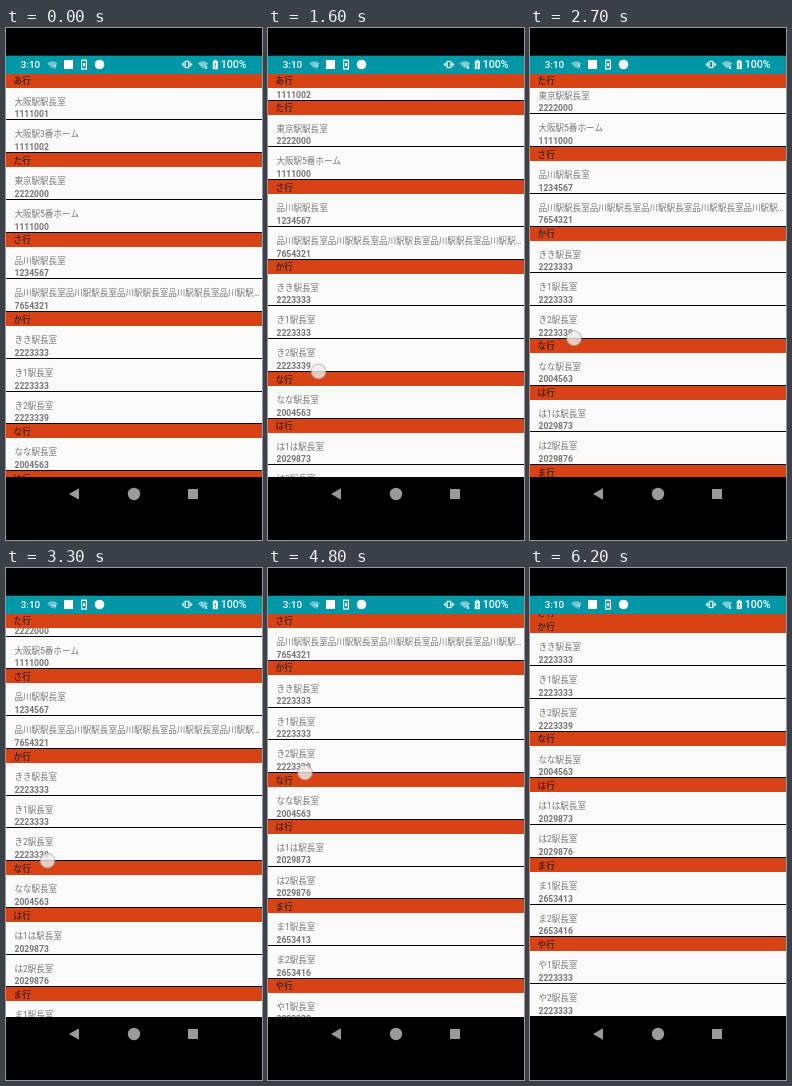
Animation of 256x512 px, one loop 6500 ms. Source, as an HTML page with a canvas:

```html
<!DOCTYPE html>
<html lang="ja">
<head>
<meta charset="utf-8">
<style>
  html, body { margin: 0; width: 100%; height: 100%; overflow: hidden; background: #000; }
  canvas { display: block; width: 256px; height: 512px; }
</style>
</head>
<body>
<canvas width="256" height="512"></canvas>
<script>
const ctx = document.querySelector('canvas').getContext('2d');
const FONT = 'Roboto, "Noto Sans CJK JP", "Noto Sans CJK", sans-serif';
const LOOP = 6500, STEP = 100;
const TOP = 46.2, BOTTOM = 449, HEADER = 14, ROW = 32.75;
const TEAL = '#0097a7', ORANGE = '#d84315', GREY = '#757575';

const sections = [
  ['あ行', ['大阪駅駅長室', '1111001'], ['大阪駅3番ホーム', '1111002']],
  ['た行', ['東京駅駅長室', '2222000'], ['大阪駅5番ホーム', '1111000']],
  ['さ行', ['品川駅駅長室', '1234567'], ['品川駅駅長室'.repeat(4) + '品川駅駅…', '7654321']],
  ['か行', ['きき駅長室', '2223333'], ['き1駅長室', '2223333'], ['き2駅長室', '2223339']],
  ['な行', ['なな駅長室', '2004563']],
  ['は行', ['は1は駅長室', '2029873'], ['は2駅長室', '2029876']],
  ['ま行', ['ま1駅長室', '2653413'], ['ま2駅長室', '2653416']],
  ['や行', ['や1駅長室', '2223333'], ['や2駅長室', '2223333']],
].map(([name, ...rows]) => ({ name, rows }));

let listHeight = 0;
for (const section of sections) {
  section.top = listHeight;
  listHeight += HEADER + ROW * section.rows.length;
}

// Monotone cubic curve through [x, y] points, flat at both ends.
function smoothCurve(points) {
  const slopes = points.slice(1).map(([x, y], i) => (y - points[i][1]) / (x - points[i][0]));
  const tangents = points.map((_, i) => {
    const a = slopes[i - 1], b = slopes[i];
    return a > 0 && b > 0 ? 2 * a * b / (a + b) : 0;
  });
  return x => {
    if (x <= points[0][0]) return points[0][1];
    const i = points.findIndex(p => p[0] >= x) - 1;
    if (i < 0) return points[points.length - 1][1];
    const [x0, y0] = points[i], [x1, y1] = points[i + 1];
    const w = x1 - x0, u = (x - x0) / w, v = 1 - u;
    return y0 * v * v * (1 + 2 * u) + y1 * u * u * (3 - 2 * u)
      + w * u * v * (tangents[i] * v - tangents[i + 1] * u);
  };
}

const scrollAt = smoothCurve([
  [600, 0], [1600, 52.5], [2700, 85.7], [3300, 103.3],
  [4000, 142.3], [4800, 191.4], [5500, 225], [6100, 232.8],
]);
const fingerShift = smoothCurve([[600, 0], [1600, 5.5], [2700, 12], [4000, 17], [4800, 19], [6100, 21]]);

function rect(x, y, w, h, color) {
  ctx.fillStyle = color;
  ctx.fillRect(x, y, w, h);
}

function disc(x, y, r, color) {
  ctx.fillStyle = color;
  ctx.beginPath();
  ctx.arc(x, y, r, 0, Math.PI * 2);
  ctx.fill();
}

function polygon(color, ...points) {
  ctx.fillStyle = color;
  ctx.beginPath();
  points.forEach(p => ctx.lineTo(...p));
  ctx.fill();
}

function text(string, x, y, color, size = 8.55, weight = 400) {
  ctx.font = `${weight} ${size}px ${FONT}`;
  ctx.fillStyle = color;
  ctx.fillText(string, x, y);
}

function wifi(x, y, color) {
  ctx.fillStyle = color;
  ctx.beginPath();
  ctx.moveTo(x, y + 4);
  ctx.arc(x, y + 4, 7.2, -Math.PI * 0.76, -Math.PI * 0.24);
  ctx.fill();
}

// Bars and dividers sit on whole pixels.
function drawHeader(name, y) {
  const top = Math.floor(y);
  rect(0, top, 256, Math.floor(y + HEADER) - top, ORANGE);
  text(name, 7.6, y + 10.1, '#111');
}

function drawRow([title, number], y) {
  text(title, 8.4, y + 16.5, GREY);
  text(number, 8.5, y + 29.1, GREY, 8.55, 700);
  rect(0, Math.floor(y + ROW) - 1, 256, 1, '#000');
}

function drawList(scroll) {
  ctx.save();
  ctx.beginPath();
  ctx.rect(0, 46, 256, BOTTOM - 46);
  ctx.clip();
  rect(0, 46, 256, BOTTOM - 46, '#fafafa');
  for (const { name, rows, top } of sections) {
    const y = TOP + top - scroll;
    drawHeader(name, y);
    rows.forEach((row, i) => drawRow(row, y + HEADER + i * ROW));
  }
  // The current header sticks until the next one pushes it out.
  const current = sections.findLastIndex(s => s.top <= scroll);
  const nextTop = sections[current + 1]?.top ?? listHeight;
  drawHeader(sections[current].name, TOP + Math.min(0, nextTop - scroll - HEADER));
  ctx.restore();
}

function drawStatusBar() {
  rect(0, 27.7, 256, 18.3, TEAL);
  text('3:10', 14.7, 40, '#fff', 9.9, 500);
  wifi(46.5, 36.5, 'rgba(255,255,255,.45)');
  text('?', 47.5, 40.5, '#fff', 6, 700);
  rect(58, 32, 9, 9, '#fff');
  ctx.strokeStyle = '#fff';
  ctx.lineWidth = 1.2;
  ctx.strokeRect(75.6, 32.2, 4.8, 8.8);
  rect(77, 35.1, 2, 3, '#fff');
  disc(93.5, 36.5, 4.8, '#fff');

  ctx.strokeRect(179.2, 33.4, 3.6, 6.2);
  for (const x of [177.2, 183.8]) rect(x, 34.5, 1, 4, '#fff');
  for (const x of [175.8, 185.2]) rect(x, 35.5, 1, 2, '#fff');
  wifi(197, 36.5, 'rgba(255,255,255,.5)');
  text('x', 198.5, 41, '#fff', 6, 700);
  rect(206.8, 32.8, 5, 8.4, '#fff');
  rect(208.3, 31.8, 2, 1, '#fff');
  rect(208.8, 35, 1, 3, TEAL);
  rect(208.8, 39, 1, 1, TEAL);
  text('100%', 214.8, 40, '#fff', 10.6, 500);
}

function drawNavigation() {
  const color = '#9a9a9a';
  polygon(color, [63, 466], [73, 460.2], [73, 471.8]);
  disc(128, 466, 6.2, color);
  rect(182, 461, 10, 10, color);
}

function drawFinger(x, y) {
  const glow = ctx.createRadialGradient(x, y, 0, x, y, 8.5);
  glow.addColorStop(0, 'rgba(238,235,232,.8)');
  glow.addColorStop(0.75, 'rgba(240,238,236,.8)');
  glow.addColorStop(0.88, 'rgba(160,155,150,.6)');
  glow.addColorStop(1, 'rgba(160,155,150,0)');
  disc(x, y, 8.5, glow);
}

function draw(now) {
  const time = Math.floor(now % LOOP / STEP) * STEP;
  const scroll = scrollAt(time);
  rect(0, 0, 256, 512, '#000');
  drawList(scroll);
  drawStatusBar();
  drawNavigation();
  if (time >= 600 && time < 6000) drawFinger(56 - fingerShift(time), 396 - scroll);
}

const start = performance.now();
function tick() {
  draw(performance.now() - start);
  requestAnimationFrame(tick);
}
tick();
</script>
</body>
</html>
```
